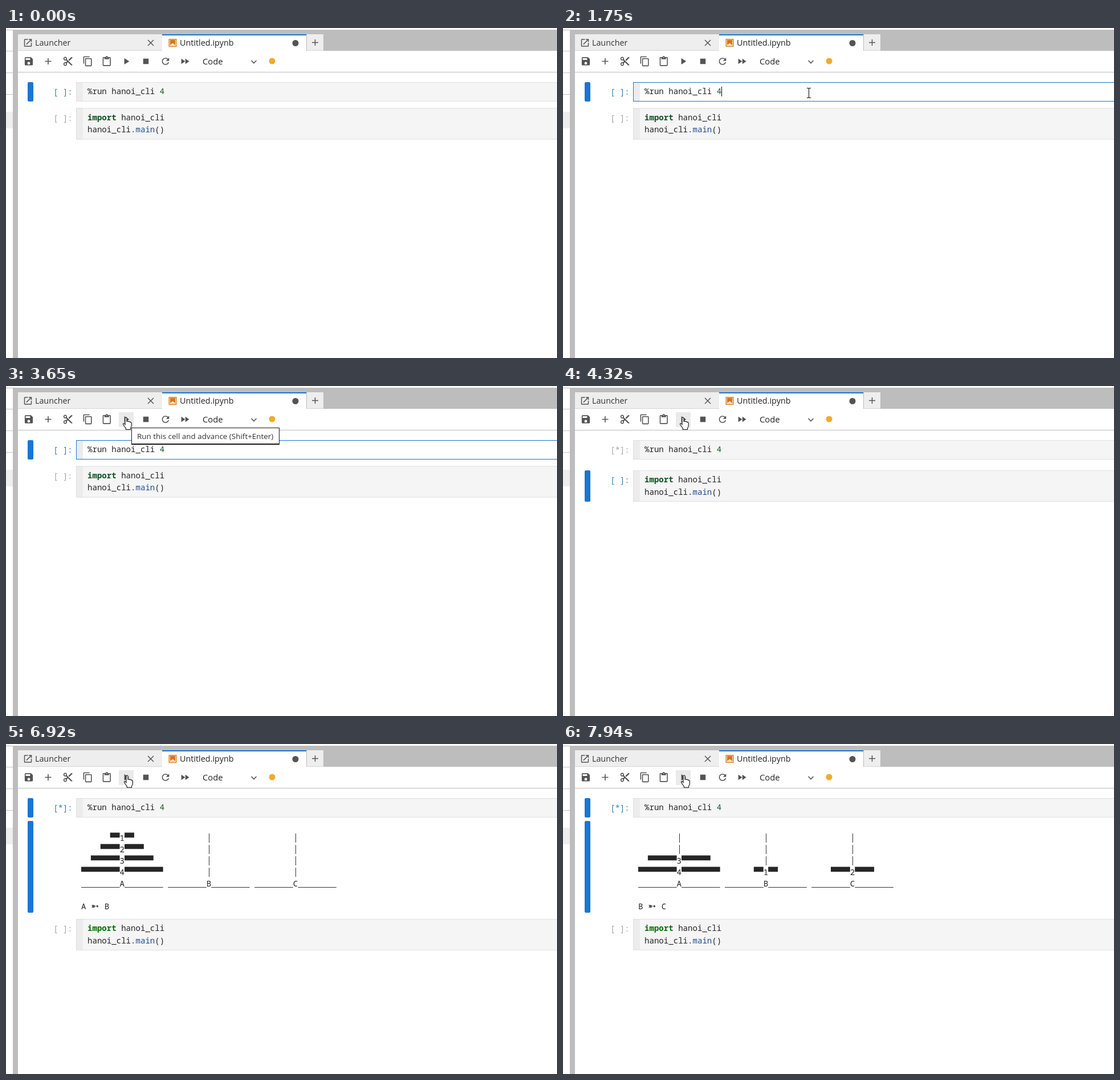
These frames come from a looping animation (967x579 px, 8 s). An HTML page with a canvas:

```html
<!DOCTYPE html>
<html lang="en">
<head>
<meta charset="utf-8">
<title>Notebook</title>
<style>
html, body { margin: 0; width: 100%; height: 100%; overflow: hidden; background: #fff; }
canvas { display: block; width: 967px; height: 579px; }
</style>
</head>
<body>
<canvas id="stage" width="967" height="579"></canvas>
<script>
const ctx = document.getElementById('stage').getContext('2d');
const LOOP = 8000;
const CHAR = 8.45;
const MONO = '14.08px "Noto Sans Mono", "DejaVu Sans Mono", monospace';
const UI = '"Open Sans", "Noto Sans", sans-serif';
const BLUE = '#1976d2';
const INK = '#242424';
const ICON = '#545454';

// Toolbar icons on a 24 unit grid: left, top, path
const icons = [
  [30.5, 49, 'M17 3H5c-1.1 0-2 .9-2 2v14c0 1.1.9 2 2 2h14c1.1 0 2-.9 2-2V7l-4-4zm-5 16c-1.66 0-3-1.34-3-3s1.34-3 3-3 3 1.34 3 3-1.34 3-3 3zm3-10H5V5h10v4z'],
  [64.5, 49, 'M19 13h-6v6h-2v-6H5v-2h6V5h2v6h6v2z'],
  [99.2, 49, 'M9.64 7.64c.23-.5.36-1.05.36-1.64 0-2.21-1.79-4-4-4S2 3.79 2 6s1.79 4 4 4c.59 0 1.14-.13 1.64-.36L10 12l-2.36 2.36C7.14 14.13 6.59 14 6 14c-2.21 0-4 1.79-4 4s1.79 4 4 4 4-1.79 4-4c0-.59-.13-1.14-.36-1.64L12 14l7 7h3v-1zM6 8c-1.1 0-2-.89-2-2s.9-2 2-2 2 .89 2 2-.9 2-2 2zm0 12c-1.1 0-2-.89-2-2s.9-2 2-2 2 .89 2 2-.9 2-2 2zM19 3l-6 6 2 2 7-7V3z'],
  [134, 49, 'M16 1H4c-1.1 0-2 .9-2 2v14h2V3h12V1zm3 4H8c-1.1 0-2 .9-2 2v14c0 1.1.9 2 2 2h11c1.1 0 2-.9 2-2V7c0-1.1-.9-2-2-2zm0 16H8V7h11v14z'],
  [167.3, 49.3, 'M19 2h-4.18C14.4.84 13.3 0 12 0c-1.3 0-2.4.84-2.82 2H5c-1.1 0-2 .9-2 2v16c0 1.1.9 2 2 2h14c1.1 0 2-.9 2-2V4c0-1.1-.9-2-2-2zm-7 0c.55 0 1 .45 1 1s-.45 1-1 1-1-.45-1-1 .45-1 1-1zm7 18H5V4h2v3h10V4h2v16z'],
  [201.3, 49, 'M8 5v14l11-7z'],
  [236, 49, 'M6 6h12v12H6z'],
  [270.5, 49, 'M17.65 6.35C16.2 4.9 14.21 4 12 4c-4.42 0-7.99 3.58-7.99 8s3.57 8 7.99 8c3.73 0 6.84-2.55 7.73-6h-2.08c-.82 2.33-3.04 4-5.65 4-3.31 0-6-2.69-6-6s2.69-6 6-6c1.66 0 3.14.69 4.22 1.78L13 11h7V4l-2.35 2.35z'],
  [304.5, 49, 'M4 18l8.5-6L4 6v12zm9-12v12l8.5-6L13 6z']
].map(([x, y, d]) => [x, y, new Path2D(d)]);

const launchIcon = new Path2D('M19 19H5V5h7V3H5c-1.11 0-2 .9-2 2v14c0 1.1.89 2 2 2h14c1.1 0 2-.9 2-2v-7h-2v7zM14 3v2h3.59l-9.83 9.83 1.41 1.41L19 6.41V10h2V3h-7z');
const arrowShape = new Path2D('M0 0V16L3.7 12.5L6.2 18.2L8.8 17.1L6.3 11.5H11.5Z');
const handShape = new Path2D('M4 2q1.5-2 3 0v6q1.7-1 3 .6q1.7-.9 2.7 .8q2-.4 2.5 1.5v4.5q0 2.5-1.7 4.5v2.4H5.3v-2.2q-2.5-3-4.8-6.8q-.2-2 1.6-1.6q1.2.6 1.9 1.8z');
const beamShape = new Path2D('M-3.5-8.5h2.5l1 1l1-1h2.5M0-7.5V7.5M-3.5 8.5h2.5l1-1l1 1h2.5');

// Pointer keys: time, x, y
const track = [
  [530, 930, 545], [663, 690, 275], [796, 520, 120], [928, 425, 35], [1060, 424, 76],
  [1192, 427, 112], [1390, 427, 112], [1720, 431, 114], [2160, 431, 113],
  [2370, 335, 102], [2510, 286, 88], [2720, 222, 66], [2860, 206, 55], [3100, 205, 54],
  [4840, 205, 54], [4850, 206, 54], [5039, 206, 54], [5110, 207, 54], [LOOP, 207, 54]
];

const within = (t, spans) => spans.some(([a, b]) => t >= a && t < b);

function rect(x, y, w, h, color) {
  ctx.fillStyle = color;
  ctx.fillRect(x, y, w, h);
}

function text(s, x, y, color = INK, font = MONO) {
  ctx.font = font;
  ctx.fillStyle = color;
  ctx.fillText(s, x, y);
}

function rounded(x, y, w, h, r) {
  ctx.beginPath();
  ctx.roundRect(x, y, w, h, r);
}

function line(points, color, width) {
  ctx.beginPath();
  points.forEach(([x, y]) => ctx.lineTo(x, y));
  ctx.strokeStyle = color;
  ctx.lineWidth = width;
  ctx.stroke();
}

function dot(x, y, r, color) {
  ctx.beginPath();
  ctx.arc(x, y, r, 0, 2 * Math.PI);
  ctx.fillStyle = color;
  ctx.fill();
}

function icon(path, x, y, scale) {
  ctx.save();
  ctx.translate(x, y);
  ctx.scale(scale, scale);
  ctx.fillStyle = ICON;
  ctx.fill(path, 'evenodd');
  ctx.restore();
}

function bar(top, bottom) {
  rounded(38, top, 10, bottom - top, 2);
  ctx.fillStyle = BLUE;
  ctx.fill();
}

function drawFrame() {
  rect(0, 0, 967, 579, '#fff');
  rect(0, 3, 12, 1, '#bdbdbd');
  [40, 78, 116].forEach(y => rect(0, y, 12, 1, '#c4c4c4'));
  rect(0, 147, 12, 29, '#eee');
  rect(12, 3, 9, 576, '#bdbdbd');
  rect(12, 3, 955, 37, '#bdbdbd');

  rect(21, 11, 253, 28.5, '#eee');
  rect(274, 11, 253, 29, '#fff');
  rect(274, 11, 253, 2, BLUE);
  rect(528, 11, 29, 28.5, '#eee');
  icon(launchIcon, 29.5, 17, 0.75);
  text('Launcher', 51, 31, '#333', '14.3px ' + UI);
  line([[249, 21], [259, 31]], ICON, 1.5);
  line([[259, 21], [249, 31]], ICON, 1.5);

  rect(285.5, 19, 14, 14, '#e08428');
  rect(287, 20.5, 11, 11, '#f8e6d2');
  ctx.beginPath();
  [[288, 21], [297, 21], [297, 30], [292.5, 26.5], [288, 30]].forEach(p => ctx.lineTo(...p));
  ctx.fillStyle = '#d9741a';
  ctx.fill();
  text('Untitled.ipynb', 305, 31, '#222', '14.4px ' + UI);
  dot(508, 26.5, 5.5, ICON);
  line([[537, 25.5], [548, 25.5]], ICON, 1.5);
  line([[542.5, 20], [542.5, 31]], ICON, 1.5);
  rect(21, 77, 946, 1, '#bdbdbd');
}

function drawToolbar(t) {
  if (within(t, [[860, 1125]])) rect(333, 44, 114, 29, '#eee');
  if (t >= 2790) rect(198, 46, 26, 26, '#eaeaea');
  icons.forEach(([x, y, path]) => icon(path, x, y, 0.79));
  text('Code', 345, 64, '#222', '14.8px ' + UI);
  line([[430.5, 57], [435, 61.5], [439.5, 57]], ICON, 1.6);
  dot(467, 58, 5.5, '#f0ab2e');
}

function drawInput(top, height, prompt, active, editing) {
  rect(123, top, 850, height, '#f5f5f5');
  if (editing) rect(135, top, 838, height, '#fff');
  rect(123, top, 12, height, '#ececec');
  ctx.strokeStyle = editing ? BLUE : '#e0e0e0';
  ctx.lineWidth = 1;
  ctx.strokeRect(123.5, top + 0.5, 850, height - 1);
  text(prompt, 83, top + 22, active ? '#307fb5' : '#a5a5a5');
}

function drawFirstCell(t) {
  const editing = within(t, [[1650, 4250]]);
  const running = t >= 4250;
  const active = !within(t, [[4250, 4540]]);
  drawInput(95, 34, running ? '[*]:' : '[ ]:', active, editing);
  if (active) bar(95, 129);
  text('%run hanoi_cli ', 143, 116);
  text('4', 143 + 15 * CHAR, 116, within(t, [[4540, 6920]]) ? INK : '#1c5a2c');
  if (editing && within(t, [[1650, 2330], [3120, 3650]])) rect(278, 103, 1, 17, '#000');
}

function drawSecondCell(t, top) {
  const active = within(t, [[4250, 4540]]);
  drawInput(top, 55, '[ ]:', active, false);
  if (active) bar(top, top + 55);
  const keyword = t < 4540 ? '#0f5224' : t < 6920 ? '#161616' : '#067006';
  text('import', 143, top + 21, keyword, 'bold ' + MONO);
  text('hanoi_cli', 143 + 7 * CHAR, top + 21);
  text('hanoi_cli.', 143, top + 42.5);
  text('main', 143 + 10 * CHAR, top + 42.5, '#1f4f8b');
  text('()', 143 + 14 * CHAR, top + 42.5);
}

// Each peg lists its disks from the top down.
function drawPegs(pegs) {
  pegs.forEach((disks, p) => {
    const left = 132 + p * 18 * CHAR;
    const mid = left + 8 * CHAR;
    for (let row = 0; row < 4; row++) {
      const y = 155 + row * 20;
      const disk = disks[row - 4 + disks.length];
      if (!disk) {
        rect(Math.round(mid + 4), y + 2, 1, 16, '#333');
        continue;
      }
      const w = 2 * disk * CHAR;
      rect(mid - w, y + 0.5, w, 8.7, '#262626');
      rect(mid + CHAR, y + 0.5, w, 8.7, '#262626');
      text(String(disk), mid, y + 15);
    }
    rect(left, 251, 8 * CHAR, 1, '#333');
    rect(mid + CHAR, 251, 8 * CHAR, 1, '#333');
    text('ABC'[p], mid, 250);
  });
}

function drawMove(from, to, x, y) {
  text(from, x, y);
  text('➵', x + 17, y, '#111', '17px "DejaVu Sans", sans-serif');
  text(to, x + 40.7, y);
}

function drawOutput(t) {
  const step = t < 7060 ? 0 : t < 7600 ? 1 : 2;
  const asking = !within(t, [[6920, 7060], [7520, 7600], [7940, LOOP]]);
  const pegs = [
    [[1, 2, 3, 4], [], []],
    [[2, 3, 4], [1], []],
    [[3, 4], [1], [2]]
  ][step];
  const [from, to] = ['AB', 'AC', 'BC'][step];

  bar(135, asking ? 297 : 296);
  drawPegs(pegs);
  drawMove(from, to, asking ? 123.5 : 132, asking ? 291 : 290);
  if (asking) {
    rounded(195.5, 276, 556, 20, 2.5);
    ctx.strokeStyle = '#101010';
    ctx.lineWidth = 2;
    ctx.stroke();
    text('↑↓ for history. Search history with c-↑/c-↓', 201, 291, '#757575');
    if (!within(t, [[5110, 5580], [6090, 6640]])) rect(201, 277, 1, 18, '#000');
  }
  drawSecondCell(t, asking ? 308.5 : 307);
}

function drawTooltip(t) {
  if (!within(t, [[3390, 4180]])) return;
  ctx.globalAlpha = t < 3450 ? 0.6 : 1;
  rect(220, 73, 260, 30, '#161616');
  rect(221, 74, 258, 27, '#fff');
  text('Run this cell and advance (Shift+Enter)', 230, 93, '#333', '13.45px ' + UI);
  ctx.globalAlpha = 1;
}

function pointerAt(t) {
  const base = t < 2000 ? 530 : 2160;
  const step = t < 2000 ? 66.25 : 70;
  const time = t > 2000 && t < 2160 ? 2160
    : t < 3200 ? base + Math.floor((t - base) / step) * step : t;
  const i = Math.max(1, track.findIndex(key => key[0] >= time));
  const [t0, x0, y0] = track[i - 1];
  const [t1, x1, y1] = track[i];
  const k = (time - t0) / (t1 - t0);
  return [x0 + (x1 - x0) * k, y0 + (y1 - y0) * k];
}

function drawPointer(t) {
  if (t < 530) return;
  const [x, y] = pointerAt(t);
  ctx.save();
  ctx.translate(Math.round(x), Math.round(y));
  ctx.lineWidth = 1.1;
  ctx.strokeStyle = '#111';
  ctx.fillStyle = '#fff';
  if (t < 2790 && y > 96 && y < 129) {
    ctx.translate(0.5, 0);
    ctx.stroke(beamShape);
  } else {
    const shape = t < 2790 ? arrowShape : handShape;
    ctx.fill(shape);
    ctx.stroke(shape);
  }
  ctx.restore();
}

function draw(t) {
  drawFrame();
  drawToolbar(t);
  drawFirstCell(t);
  if (t >= 4540) drawOutput(t);
  else drawSecondCell(t, t >= 4250 ? 148 : 140.5);
  drawTooltip(t);
  drawPointer(t);
}

const start = performance.now();
function tick() {
  draw((performance.now() - start) % LOOP);
  requestAnimationFrame(tick);
}
tick();
</script>
</body>
</html>
```
